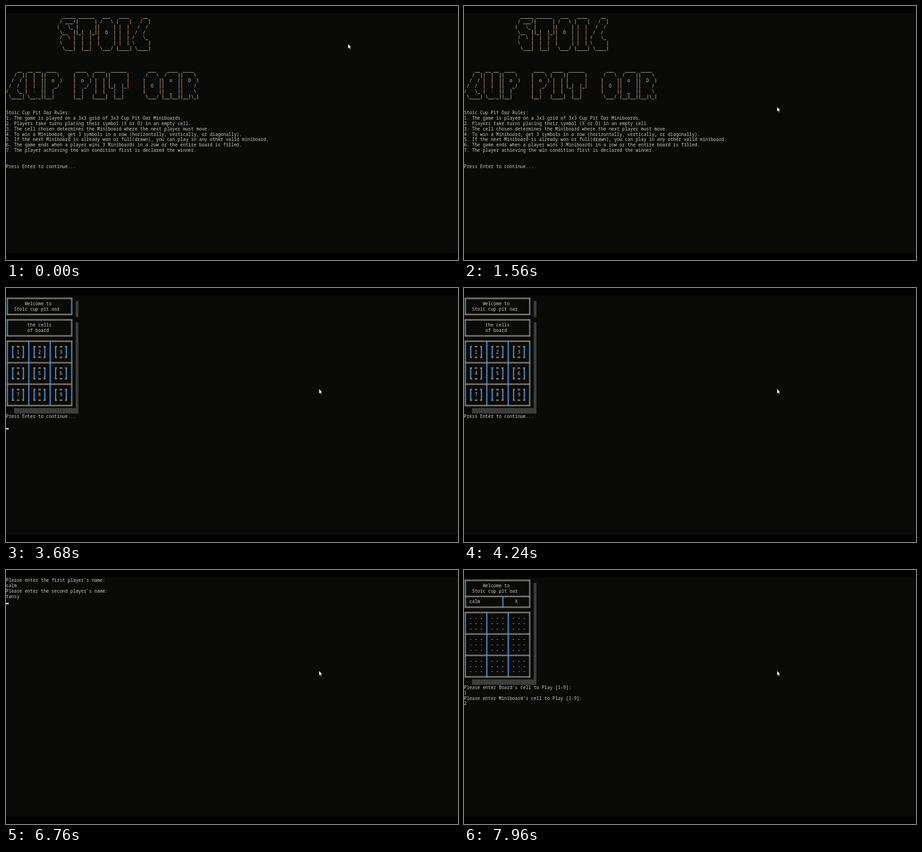
An HTML page with a canvas for the animation above (8000 ms loop, 998 px wide and 561 px high).

```html
<!DOCTYPE html>
<html lang="en">
<head>
<meta charset="utf-8">
<title>Console board game</title>
<style>
  html, body { margin: 0; width: 100%; height: 100%; overflow: hidden; background: #000; }
  canvas { display: block; }
</style>
</head>
<body>
<canvas id="stage" width="998" height="561"></canvas>
<script>
const ctx = document.getElementById('stage').getContext('2d');
const LOOP = 8000, BLINK = 530;
const CW = 5.92, CH = 11.84, TOP = 16.9;

// Block letters for the title, seven rows each
const LETTERS = {
  S: ['  _____', ' / ___/', '(   \\_ ', ' \\__  |', ' /  \\ |', ' \\    |', '  \\___|'],
  T: [' ______ ', '|      |', '|      |', '|_|  |_|', '  |  |  ', '  |  |  ', '  |__|  '],
  O: ['  ___  ', ' /   \\ ', '|     |', '|  O  |', '|     |', '|     |', ' \\___/ '],
  I: [' ____ ', '|    |', ' |  | ', ' |  | ', ' |  | ', ' |  | ', '|____|'],
  C: ['    __ ', '   /  ]', '  /  / ', ' /  /  ', '/   \\_ ', '\\     |', ' \\____|'],
  U: [' __ __ ', '|  |  |', '|  |  |', '|  |  |', '|  :  |', '|     |', ' \\__,_|'],
  P: [' ____  ', '|    \\ ', '|  o  )', '|   _/ ', '|  |   ', '|  |   ', '|__|   '],
  A: ['  ____ ', ' /    |', '|  o  |', '|     |', '|  _  |', '|  |  |', '|__|__|'],
  R: [' ____  ', '|    \\ ', '|  D  )', '|    / ', '|    \\ ', '|  .  \\', '|__|\\_|']
};

const banner = (word, row) => [...word].map(c => LETTERS[c][row]).join('');

function introScreen() {
  const title = [0, 1, 2, 3, 4, 5, 6].map(r => ' '.repeat(19) + banner('STOIC', r));
  const words = [0, 1, 2, 3, 4, 6].map(r =>
    banner('CUP', r).padEnd(25) + banner('PIT', r).padEnd(26) + banner('OAR', r));
  return [
    ...title, '', '', '', ...words, '', '',
    'Stoic Cup Pit Oar Rules:',
    '1. The game is played on a 3x3 grid of 3x3 Cup Pit Oar Miniboards.',
    '2. Players take turns placing their symbol (X or O) in an empty cell.',
    '3. The cell chosen determines the Miniboard where the next player must move.',
    '4. To win a Miniboard, get 3 symbols in a row (horizontally, vertically, or diagonally).',
    '5. If the next Miniboard is already won or full(drawn), you can play in any other valid miniboard.',
    '6. The game ends when a player wins 3 Miniboards in a row or the entire board is filled.',
    '7. The player achieving the win condition first is declared the winner.',
    '', '', 'Press Enter to continue...'
  ];
}

const bar = (l, m, r, widths) => l + widths.map(w => '═'.repeat(w)).join(m) + r;
const side = text => '║' + text.padEnd(23) + '║';
const WELCOME = [bar('╔', '', '╗', [23]), side('      Welcome to'), side('  Stoic cup pit oar')];
const THIRDS = [7, 7, 7];

// cell(n) returns the three inner rows of the n-th miniboard
function grid(cell) {
  const out = [bar('╔', '╦', '╗', THIRDS)];
  for (let r = 0; r < 3; r++) {
    const cells = [1, 2, 3].map(c => cell(r * 3 + c));
    for (let i = 0; i < 3; i++) out.push('║' + cells.map(c => ' ' + c[i] + ' ').join('║') + '║');
    out.push(r < 2 ? bar('╠', '╬', '╣', THIRDS) : bar('╚', '╩', '╝', THIRDS));
  }
  return out;
}

const shade = (rows, bare) => [
  ...rows.map((s, i) => bare.includes(i) ? s : s.padEnd(26) + '▒'),
  '   ' + '▒'.repeat(24)
];

const INTRO = introScreen();
const CELLS = [
  ...shade([
    ...WELCOME, bar('╚', '', '╝', [23]),
    bar('╔', '', '╗', [23]), side('       the cells'), side('       of board'), bar('╚', '', '╝', [23]),
    ...grid(n => ['╔ ═ ╗', `║ ${n} ║`, '╚ ═ ╝'])
  ], [0, 4]),
  'Press Enter to continue...'
];
const GAME = shade([
  ...WELCOME, bar('╠', '╦', '╣', [13, 9]),
  '║ calm        ║    X    ║',
  bar('╚', '╩', '╝', [13, 9]),
  ...grid(() => ['- - -', '- - -', '- - -'])
], [0]);

const typed = (word, t, start, step) =>
  word.slice(0, Math.max(0, Math.floor((t - start) / step) + 1));

// Screen content, caret row and the time the caret blink counts from
function scene(t) {
  if (t < 1800) return { rows: INTRO, caret: 29, from: 530 };
  if (t < 2160) return { rows: INTRO, caret: 30, from: 1800 };
  if (t < 3600) return { rows: CELLS, caret: 23, from: 2160 };
  if (t < 4400) return { rows: CELLS, caret: 24, from: 3600 };
  if (t < 5360) return { rows: [], caret: 0, from: 4800 };
  if (t < 7000) {
    const rows = ["Please enter the first player's name:", typed('calm', t, 5560, 90)];
    if (t >= 5960) rows.push("Please enter the second player's name:", typed('tansy', t, 6120, 100));
    return t < 6760
      ? { rows, caret: rows.length - 1, from: 5360 }
      : { rows, caret: 4, from: 6740 };
  }
  const rows = [...GAME, "Please enter Board's cell to Play [1-9]:", typed('1', t, 7360, 80)];
  if (t >= 7600) rows.push("Please enter Miniboard's cell to Play [1-9]:", typed('2', t, 7880, 80));
  return { rows, caret: rows.length - 1, from: 7000 };
}

function rect(color, x, y, w, h) {
  ctx.fillStyle = color;
  ctx.fillRect(x, y, w, h);
}

// Arms of each box character: left, right, up, down
const ARMS = {
  '═': 'lr', '║': 'ud', '╔': 'rd', '╗': 'ld', '╚': 'ru', '╝': 'lu',
  '╠': 'rud', '╣': 'lud', '╦': 'lrd', '╩': 'lru', '╬': 'lrud'
};

function drawBox(arms, x, y) {
  const cx = x + CW / 2, cy = y + CH / 2 + 0.1;
  const up = arms.includes('u'), down = arms.includes('d');
  if (up || down) {
    const y0 = up ? y : cy - 1, y1 = down ? y + CH : cy + 1;
    rect('#8f8a80', cx - 1.5, y0, 3, y1 - y0);
    rect('#2b78b9', cx - 1.1, y0, 2.3, y1 - y0);
  }
  const left = arms.includes('l'), right = arms.includes('r');
  if (left || right) {
    const x0 = left ? x : cx - 1.4, x1 = right ? x + CW : cx + 1.4;
    rect('#45443f', x0, cy - 0.8, x1 - x0, 1.6);
    rect('#b4b1a8', x0, cy - 1.5, x1 - x0, 0.9);
    rect('#b4b1a8', x0, cy + 0.6, x1 - x0, 0.9);
  }
}

function drawShade(x, y) {
  rect('#30312f', x, y, CW, CH);
  for (let j = 0; j < 6; j++)
    for (let i = 0; i < 3; i++)
      rect('#686a64', x + i * 1.97 + (j % 2), y + j * 1.97, 1, 1);
}

function drawChar(c, x, y) {
  if (c === ' ') return;
  if (ARMS[c]) return drawBox(ARMS[c], x, y);
  if (c === '▒') return drawShade(x, y);
  if (c === '|') {
    rect('#3474ad', x + CW / 2 - 0.75, y + 0.7, 0.75, 10.6);
    rect('#dc9149', x + CW / 2, y + 0.7, 0.85, 10.6);
    return;
  }
  ctx.fillStyle = '#cccccc';
  ctx.fillText(c, x, y + 9.2);
}

// Mouse stops: time, x, y
const PATH = [[0, 755, 83], [760, 906, 128], [900, 904, 140], [1480, 691, 222]];

function mouseAt(t) {
  for (let i = 1; i < PATH.length; i++) {
    const [t0, x0, y0] = PATH[i - 1], [t1, x1, y1] = PATH[i];
    if (t < t1) {
      const k = (1 - Math.cos(Math.PI * (t - t0) / (t1 - t0))) / 2;
      return [x0 + (x1 - x0) * k, y0 + (y1 - y0) * k];
    }
  }
  return PATH[PATH.length - 1].slice(1);
}

const ARROW = new Path2D('M0 0V12L2.8 9.5L4.6 13.6L6.4 12.8L4.7 8.9H8Z');

function drawMouse([x, y]) {
  ctx.save();
  ctx.translate(x, y);
  ctx.strokeStyle = '#000';
  ctx.lineWidth = 1;
  ctx.fillStyle = '#fff';
  ctx.fill(ARROW);
  ctx.stroke(ARROW);
  ctx.restore();
}

function draw(t) {
  rect('#000', 0, 0, 998, 561);
  rect('#0a0a08', 0, 16.5, 998, 528);
  ctx.font = '9.87px "Noto Sans Mono", "DejaVu Sans Mono", monospace';
  const { rows, caret, from } = scene(t);
  rows.forEach((line, r) =>
    [...line].forEach((c, i) => drawChar(c, i * CW, TOP + r * CH)));
  const phase = (((t - from) % (2 * BLINK)) + 2 * BLINK) % (2 * BLINK);
  if (phase < BLINK) {
    const col = (rows[caret] || '').length;
    rect('#f2f2f2', col * CW, TOP + caret * CH + 8.4, CW, 2.9);
  }
  drawMouse(mouseAt(t));
}

const start = performance.now();
function tick() {
  draw((performance.now() - start) % LOOP);
  requestAnimationFrame(tick);
}
tick();
</script>
</body>
</html>
```
